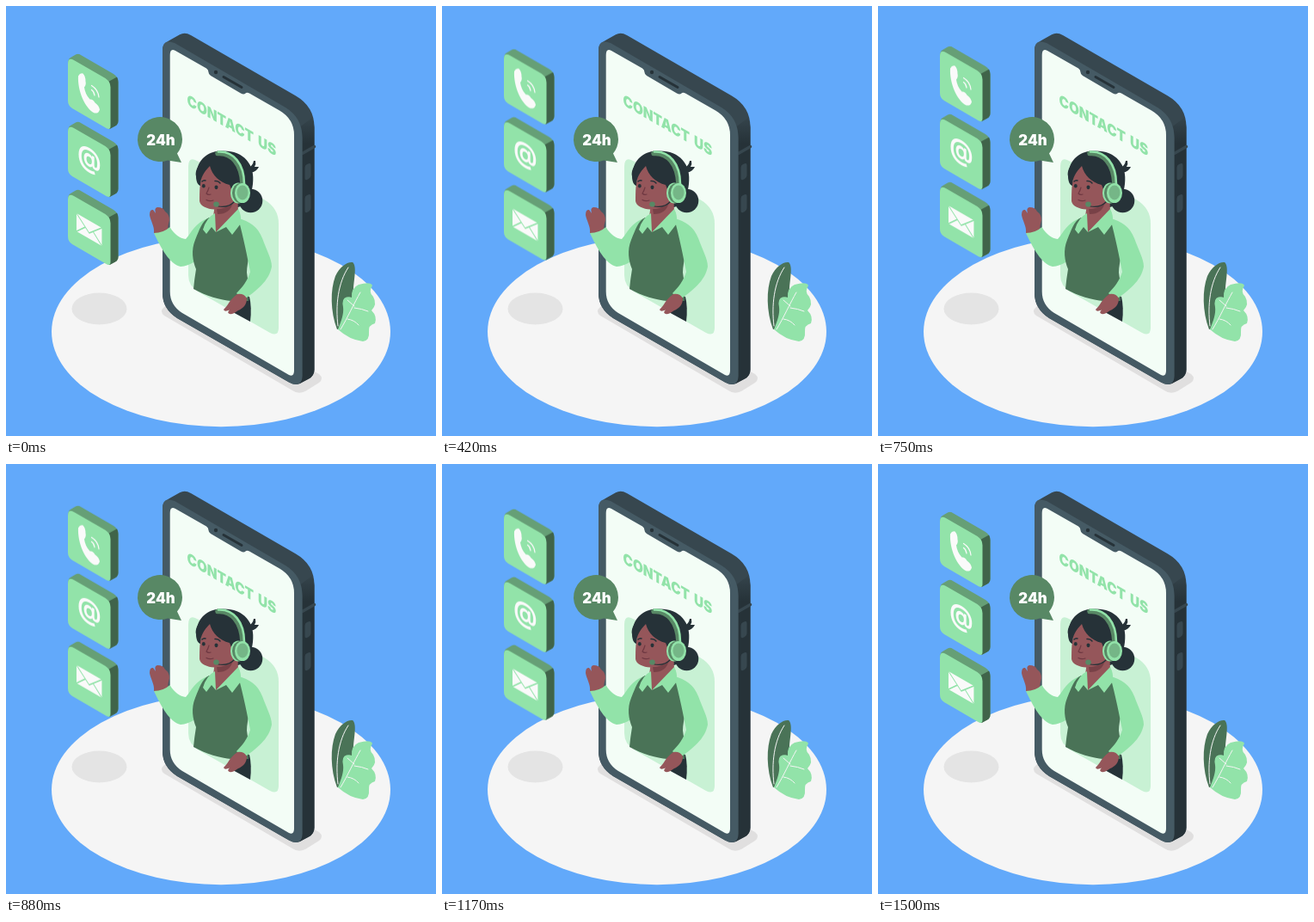
Recreate the animation shown at these times as an HTML page. Size 500x500 px, loop 1.54 s.

```html
<!DOCTYPE html>
<html lang="en">
<head>
<meta charset="utf-8">
<title>Contact us</title>
<style>
  html, body { margin: 0; width: 100%; height: 100%; overflow: hidden; background: #62a9fa; }
  svg { display: block; width: 100vw; height: 100vh; }
  text { font-family: Inter, "Open Sans", sans-serif; font-weight: 900; }
  .mint { fill: #92e3a9; }
  .moss { fill: #588865; }
  .vest { fill: #4a7357; }
  .ink { fill: #263238; }
  .slate { fill: #37474f; }
  .steel { fill: #455a64; }
  .skin { fill: #95565a; }
  .line { fill: none; stroke-linecap: round; stroke-linejoin: round; }
</style>
</head>
<body>
<svg viewBox="0 0 500 500">
  <defs>
    <linearGradient id="corner" gradientUnits="userSpaceOnUse" x1="0" y1="125" x2="0" y2="160">
      <stop offset="0" stop-color="#37474f"/>
      <stop offset="1" stop-color="#263238"/>
    </linearGradient>
    <g id="tile">
      <path fill="#669f76" d="M72 68Q72 62 75 60.500L81 57Q84 55.500 87 57.500L125 79.500Q130.500 83 130.500 89V134Q130.500 138 127 140L120 143.700L72 90Z"/>
      <path fill="#40644a" d="M120 88L129 83Q130.500 85.500 130.500 89V134Q130.500 138 127 140L120.500 143.500L117 142Z"/>
      <path class="mint" d="M72 67.500Q72 60 79 63.500L115.500 84.500Q121.500 88.500 121.500 95V140Q121.500 145.500 116.500 142.500L77 119.500Q72 116.500 72 110.500Z"/>
    </g>
  </defs>

  <!-- floor and shadows -->
  <ellipse cx="250" cy="378.800" rx="197" ry="110.400" fill="#f5f5f5"/>
  <ellipse cx="108.500" cy="352" rx="32" ry="18.500" fill="#e4e4e4"/>
  <path fill="#e0dfdf" d="M184 350Q178 355 184 360L333 447Q340 452 348 448L364 438Q370 433 364 428L200 340Z"/>

  <!-- phone -->
  <path class="slate" d="M182 51Q182 44 190 40L202 33.200Q208 29.800 215 34L337 104.500Q358.500 117 358.500 141V423Q358.500 430 352 433.500L342 439Q336 441.500 329 437.500L199 363Q182 352 182 334Z"/>
  <path fill="url(#corner)" d="M344.500 151Q344 145 342.500 140L356 130Q358.500 135 358.500 141V423Q358.500 430 352 433.500L341 439Q344.500 436 344.500 430Z"/>
  <path class="line" stroke="#37474f" stroke-width="3.500" stroke-linecap="butt" d="M344.500 171.500L358.500 163.500"/>
  <path class="steel" d="M182 51Q182 37.500 196 43L325 118Q344.500 130 344.500 153V430Q344.500 439 338 440Q334 440.500 329 437.500L199 363Q182 352 182 334Z"/>
  <path fill="#f3fdf6" d="M190.700 57Q190.700 48.500 197 52L233 72.500Q235.500 74 235.500 77Q235.500 79.500 238 81L273 101.500Q276.500 103.500 278.500 101.500Q280 100 283 101.500L318 121.500Q335 131.500 335 150V424Q335 431.500 329 429L205 357Q190.700 348 190.700 332Z"/>
  <circle cx="244" cy="77" r="2.200" class="ink"/>
  <path class="line" stroke="#263238" stroke-width="3" d="M253 82.500L274 94.500"/>
  <path class="slate" d="M347.500 188Q347.500 185 350 184L352.500 183Q354.500 182.500 354.500 185V197Q354.500 199.500 352 201L350 202Q347.500 203 347.500 200ZM347.500 224Q347.500 221 350 220L352.500 219Q354.500 218.500 354.500 221V235Q354.500 237.500 352 239L350 240Q347.500 241 347.500 238Z"/>

  <text class="mint" font-size="17.700" word-spacing="2" transform="matrix(.866 .5 0 1 210.500 115)">CONTACT US</text>
  <path fill="#c8f1d4" d="M212 187Q212 174.500 222 180L300 225Q317 235 317 253V374Q317 385 307 380L223 332Q212 325 212 313Z"/>

  <!-- agent: hair behind -->
  <circle class="ink" cx="284.500" cy="226.500" r="13.800"/>
  <path class="ink" d="M222 192C224 176 238 168 252 168.500C276 168 290 184 287 207C285 226 274 236 262 235L245 200ZM281 189Q287 186 288 180L290 180Q291 184 289 187L294 187Q292 192 285 194Z"/>
  <!-- trousers, raised arm -->
  <path class="ink" d="M262 341L283 338Q286 350 284 367L262 355Z"/>
  <path class="skin" d="M172 264C173 256 168 250 167 243Q167 236 171 237L174 241Q172 235 176 234Q183 234 185 239Q190 242 190 249Q188 255 188 262L180 268Z"/>
  <path class="mint" d="M172 264Q183 264 190.500 257C196 266 202 270 209 271C215 265 219 252 237 246L236 285C225 293 214 303 203 303C190 300 180 281 172 264Z"/>
  <!-- torso -->
  <path class="vest" d="M236 246C228 250 225 260 220 272C215 284 217 296 221 306Q219 318 218 329C232 337 250 342 262 343L282 343Q283 328 280 310Q280 300 285 282L272 246Z"/>
  <path class="mint" d="M270 247C283 250 293 257 298 270C303 284 309 294 309 303C306 320 291 331 276 342L268 334C275 327 281 319 284 309C281 294 276 268 270 247Z"/>
  <path class="skin" d="M280 340C280 348 275 352 270 354Q262 360 259 357.500Q257 356 260 353.500Q254 356 253 353Q256 350 258 347Q262 340 269 335Q277 334 280 340Z"/>
  <!-- neck and collar -->
  <path class="skin" d="M243 230L270 220Q269 236 271 242L244 263L241 245Z"/>
  <path fill="#784147" d="M245 236Q257 236 264 228Q261 242 246 242Z"/>
  <path class="mint" d="M243 241L244 263L239 257L233 265L229 260Q233 246 243 241ZM270 236L244 263L256 257L263 266L273 253Q274 243 270 236Z"/>
  <!-- face -->
  <path class="skin" d="M230 189C225 201 225 217 225 227C226 233 234 236 242 236.500C255 236 264 229 268 218L265 193L245 178Z"/>
  <path class="ink" d="M245 174C230 176 219 187 221 198C221 204 223 208 226 209C226 200 230 193 237 186C240 197 248 205 260 208L262 213L273 205C270 184 258 172 245 174Z"/>
  <ellipse class="ink" cx="229.800" cy="209.300" rx="1.900" ry="2.300"/>
  <ellipse class="ink" cx="244.500" cy="210.800" rx="2" ry="2.400"/>
  <path class="line" stroke="#263238" stroke-width="1.500" d="M228 204Q230 202 232 203M243 203.500Q247 203 249 206"/>
  <path class="line" stroke="#6f3842" stroke-width="1.200" d="M236 211Q235 215 233 218Q235 220 238 219M233 225.500Q237 227.500 241 226"/>
  <!-- headset -->
  <path class="line" stroke="#588865" stroke-width="5.500" d="M246 171.500C262 170 274 184 275 207"/>
  <path class="line" stroke="#92e3a9" stroke-width="2.600" d="M247 169.500C264 168.500 277 183 277 207"/>
  <path class="line" stroke="#263238" stroke-width="1.200" d="M266 227Q259 235 247 233"/>
  <ellipse class="moss" cx="244.500" cy="230.500" rx="3.300" ry="3.100"/>
  <ellipse class="mint" cx="270" cy="217.500" rx="9" ry="12"/>
  <ellipse class="moss" cx="272.500" cy="217.500" rx="9.500" ry="11.500"/>
  <ellipse class="mint" cx="275" cy="217.500" rx="9" ry="11.500"/>
  <ellipse fill="#75b687" cx="275" cy="217" rx="6.500" ry="8.500"/>

  <!-- bubble -->
  <path class="moss" d="M205 155A26 26 0 1 0 188 179.500L204 182L199 171.500Q205 164 205 155Z"/>
  <text x="180" y="161.500" font-size="16.800" text-anchor="middle" fill="#fff">24h</text>

  <!-- plant -->
  <path class="vest" d="M385 376C377 355 377 330 383 314C388 303 397 297 403 298C408 302 405 316 404 328L400 375Z"/>
  <path class="line" stroke="#f5f5f5" stroke-width="1" d="M386 372C383 348 386 322 398 304"/>
  <path class="mint" d="M386 376C390 366 393 358 392 350Q390 340 396 338.500Q400 338 402 339Q401 328 410 324Q424 320 426 325Q421 333 427 338Q432 347 425 354Q432 361 429 369Q421 371 422 379Q423 389 415 390Q399 388 386 376Z"/>
  <path class="line" stroke="#f5f5f5" stroke-width="1" d="M389 376C397 363 405 345 412 333M405 349L397 342M405 351Q414 352 421 355M397 364Q405 365 410 371"/>

  <!-- floating tiles -->
  <g id="tiles">
    <use href="#tile"/>
    <use href="#tile" y="79"/>
    <use href="#tile" y="158"/>
    <g fill="#fafafa">
      <path d="M84 82Q86 78 89.500 79Q92.500 82 92.500 88Q93.500 92 91 95Q92 103 97.500 109Q101 108.500 103.500 113Q108 116 109 121Q107.500 126 103 125C92 120 83 99 84 82Z"/>
      <path class="line" stroke="#fafafa" stroke-width="1.200" d="M99.500 98Q102.500 100 103 104.500M99.500 93Q107 97.500 108 106.500"/>
      <text font-size="31" style="font-weight:700" text-anchor="middle" transform="matrix(.866 .5 0 1 97 188)">@</text>
      <g transform="matrix(.866 .5 0 1 96.700 260.500)">
        <rect x="-17" y="-10.500" width="34" height="21" rx="1"/>
        <path class="line" stroke="#92e3a9" stroke-width="1.400" d="M-17 -10.500L0 4L17 -10.500M-17 10.500L-5.500 0M17 10.500L5.500 0"/>
      </g>
    </g>
  </g>
</svg>
<script>
  const LOOP = 1540, STEPS = 37, FPS = 24, LIFT = 10;

  // Triangle wave with a 1.5 s period, held at 24 steps per second.
  const lift = k => {
    const p = ((k + 1) % 36) / 36;
    return LIFT * (1 - Math.abs(1 - 2 * p));
  };
  const pose = (k, offset) => ({
    offset,
    transform: `translateY(${-lift(k).toFixed(3)}px)`,
    easing: 'step-end'
  });

  const frames = [];
  for (let k = 0; k < STEPS; k++) {
    const start = Math.round(k * 100 / FPS) * 10;
    frames.push(pose(k, start / LOOP));
  }
  frames.push(pose(STEPS - 1, 1));
  document.getElementById('tiles').animate(frames, { duration: LOOP, iterations: Infinity });
</script>
</body>
</html>
```
